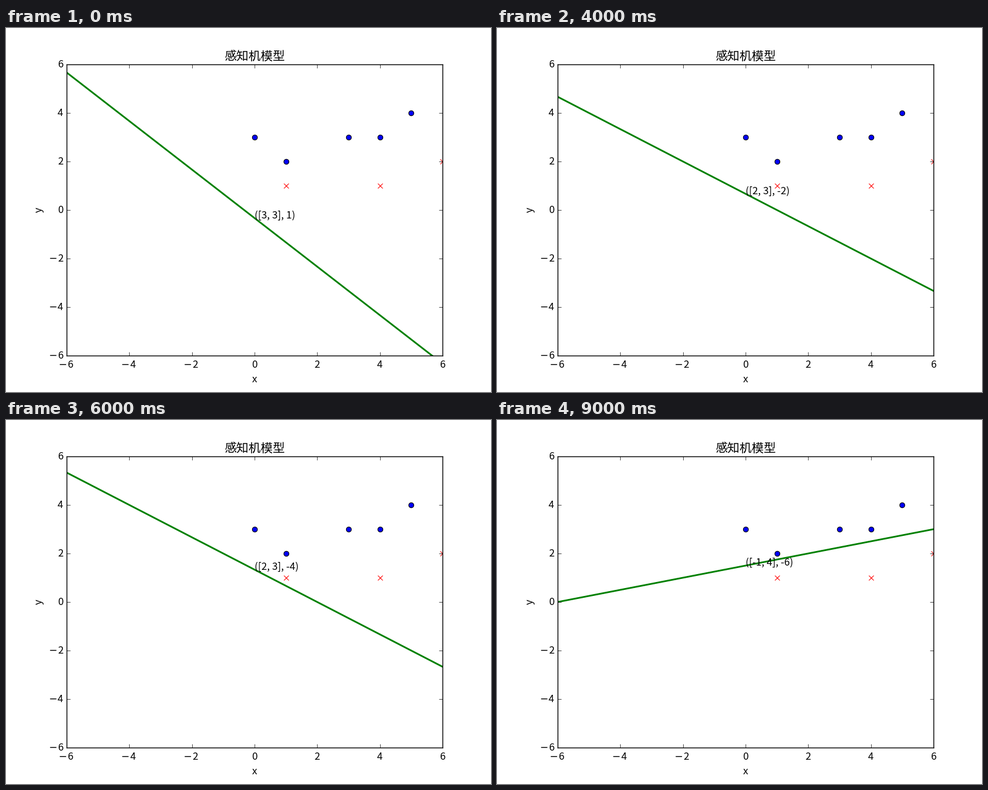
Animation, 800 px wide and 600 px high, one loop 9.5 s. Source, as a matplotlib script:

```python
import matplotlib.pyplot as plt
from matplotlib.animation import FuncAnimation

W, H = 800, 600
FONT = "Noto Sans CJK JP"
SAMPLES = [((3, 3), 1), ((4, 3), 1), ((1, 1), -1), ((1, 2), 1),
           ((0, 3), 1), ((5, 4), 1), ((4, 1), -1), ((6, 2), -1)]


def train(samples):
    """Perceptron updates, always on the first misclassified sample."""
    w, b, steps = [0, 0], 0, []
    while True:
        for (x, y), sign in samples:
            if sign * (w[0] * x + w[1] * y + b) <= 0:
                w = [w[0] + sign * x, w[1] + sign * y]
                b += sign
                steps.append((w, b))
                break
        else:
            return steps


def hold_undefined(steps):
    """Repeat the previous step where the line has no slope."""
    held = []
    for step in steps:
        held.append(step if step[0][1] else held[-1])
    return held


history = hold_undefined(train(SAMPLES))
history.insert(0, history[0])

fig = plt.figure(figsize=(W / 100, H / 100), dpi=100, facecolor="white")
ax = fig.add_axes([0.125, 0.1, 0.775, 0.8])
ax.set(xlim=(-6, 6), ylim=(-6, 6))
ax.set_axisbelow(False)
ticks = range(-6, 7, 2)
ax.set_xticks(ticks)
ax.set_yticks(ticks)
ax.tick_params(direction="in", length=4, width=0.5, top=True, right=True,
               labelbottom=False, labelleft=False)
for spine in ax.spines.values():
    spine.set_linewidth(1.0)


def put(x, y, text, size=12, font=FONT, **kw):
    """Text centred on x with its baseline at y, in pixels from the top left."""
    fig.text(x / W, 1 - y / H, text, size=size, family=font,
             ha="center", va="baseline", **kw)


def put_number(x, y, value, digit_x):
    if value < 0:
        put(x - 7.2, y, "\u2212", font="DejaVu Sans")
        x += 5.7
    else:
        x = digit_x
    put(x, y, str(abs(value)))


for t in ticks:
    cx = 410 + t * 620 / 12
    cy = 300 - t * 40
    put_number(cx, 560, t, cx)
    put_number(84, cy + 5, t, 89.7)

put(410, 53, "感知机模型", size=14.4)
put(410, 584, "x")
put(59, 300, "y", rotation=90, rotation_mode="anchor")

line, = ax.plot([], [], color="green", lw=2)
label = ax.text(0, 0, "", size=12, family=FONT, ha="left", va="baseline")
for sign, style, color, edge in ((1, "o", "blue", "black"),
                                 (-1, "x", "red", "red")):
    xs, ys = zip(*(p for p, s in SAMPLES if s == sign))
    ax.plot(xs, ys, style, color=color, ms=6, mec=edge, mew=0.75)


def update(i):
    w, b = history[i]
    xs = (-7, 7)
    line.set_data(xs, [-(b + w[0] * x) / w[1] for x in xs])
    label.set_text(str((w, b)))
    label.set_position((0, -b / w[1]))
    return line, label


anim = FuncAnimation(fig, update, frames=len(history), interval=500,
                     repeat=True, repeat_delay=0, blit=False)
plt.show()
```
